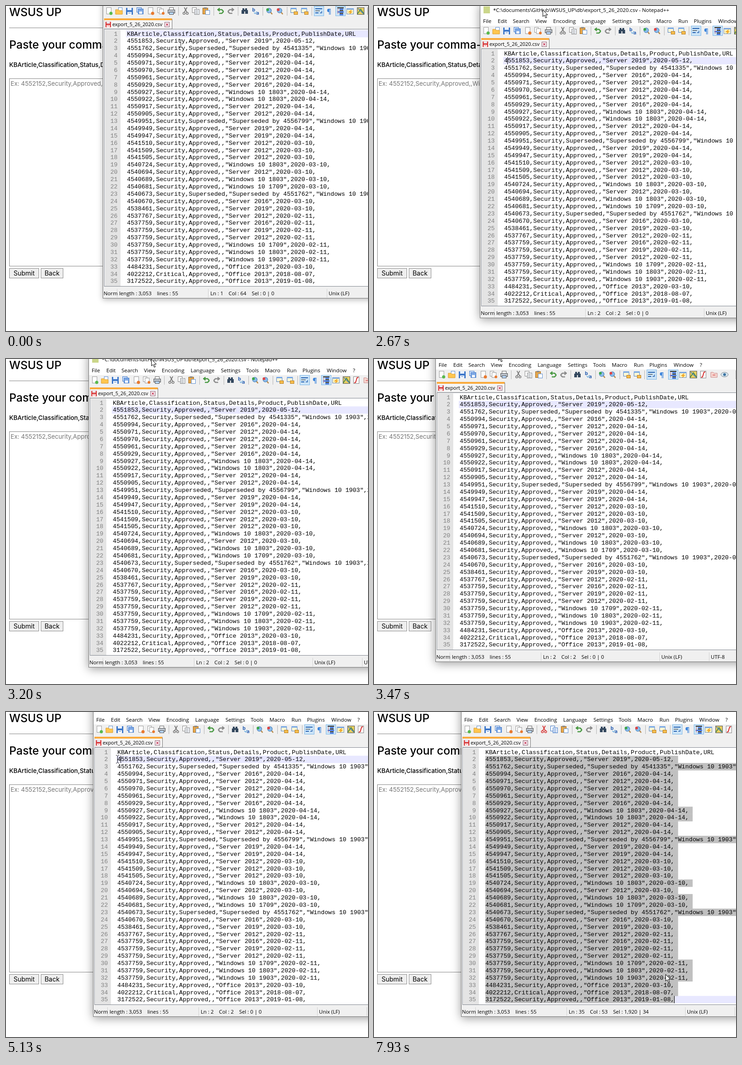
These frames come from a looping animation (790x709 px, 8000 ms). An HTML page with a canvas:

```html
<!DOCTYPE html>
<html lang="en">
<head>
<meta charset="utf-8">
<title>CSV export</title>
<style>
  html, body { margin: 0; width: 100%; height: 100%; overflow: hidden; background: #fff; }
  canvas { display: block; width: 790px; height: 709px; }
</style>
</head>
<body>
<canvas id="stage" width="790" height="709"></canvas>
<script>
const ctx = document.getElementById('stage').getContext('2d');
const UI = '"Open Sans", "Noto Sans", sans-serif';
const MONO = '13.23px "Liberation Mono", monospace';
const CHAR = 7.937, ROW = 15.88, ROW_TOP = 101.5, TEXT_X = 53;
const HEADER = 'KBArticle,Classification,Status,Details,Product,PublishDate,URL';

// id | product | date | superseding article
const records = `4551853|Server 2019|2020-05-12
4551762|Windows 10 1903|2020-04-14|4541335
4550994|Server 2016|2020-04-14
4550971|Server 2012|2020-04-14
4550970|Server 2012|2020-04-14
4550961|Server 2012|2020-04-14
4550929|Server 2016|2020-04-14
4550927|Windows 10 1803|2020-04-14
4550922|Windows 10 1803|2020-04-14
4550917|Server 2012|2020-04-14
4550905|Server 2012|2020-04-14
4549951|Windows 10 1903|2020-04-14|4556799
4549949|Server 2019|2020-04-14
4549947|Server 2019|2020-04-14
4541510|Server 2012|2020-03-10
4541509|Server 2012|2020-03-10
4541505|Server 2012|2020-03-10
4540724|Windows 10 1803|2020-03-10
4540694|Server 2012|2020-03-10
4540689|Windows 10 1803|2020-03-10
4540681|Windows 10 1709|2020-03-10
4540673|Windows 10 1903|2020-03-10|4551762
4540670|Server 2016|2020-03-10
4538461|Server 2019|2020-03-10
4537767|Server 2012|2020-02-11
4537759|Server 2016|2020-02-11
4537759|Server 2019|2020-02-11
4537759|Server 2012|2020-02-11
4537759|Windows 10 1709|2020-02-11
4537759|Windows 10 1803|2020-02-11
4537759|Windows 10 1903|2020-02-11
4484231|Office 2013|2020-03-10
4022212|Office 2013|2018-08-07
3172522|Office 2013|2019-01-08`;

const lines = [HEADER, ...records.split('\n').map(record => {
  const [id, product, date, newer] = record.split('|');
  const kind = id === '4022212' ? 'Critical' : 'Security';
  const status = newer ? `Superseded,"Superseded by ${newer}"` : 'Approved,';
  return `${id},${kind},${status},"${product}",${date},`;
})];

// Time runs in steps of 1/15 s
const STEPS = 120, FOCUS = 17, CLICK = 84, SELECT = 110;
const windowPath = [[36, 211, -49], [38, 218, -30], [41, 238, 6], [45, 238, 9], [48, 180, -14],
  [50, 114, -26], [52, 134, -26], [55, 146, -26], [57, 172, -26], [59, 190, -22]];
const approach = [[0, 381, 82], [4, 330, 20], [7, 282, 40], [9, 276, 66], [14, 274, 70],
  [17, 274, 70], [21, 290, 40], [25, 330, -10], [28, 348, -35]];
const selecting = [[59, 327, -8], [61, 332, 4], [63, 330, 18], [67, 270, 92], [69, 232, 134],
  [72, 243, 103], [77, 243, 103], [79, 240, 107], [81, 243, 103], [84, 243, 103], [89, 340, 250],
  [95, 532, 470], [97, 545, 490], [103, 682, 590], [108, 671, 623], [110, 671, 627],
  [116, 671, 627], [119, 636, 572]];

function along(path, s) {
  const next = path.findIndex(key => key[0] > s);
  if (next === 0) return path[0].slice(1);
  if (next < 0) return path[path.length - 1].slice(1);
  const a = path[next - 1], b = path[next], k = (s - a[0]) / (b[0] - a[0]);
  return [1, 2].map(i => Math.round(a[i] + (b[i] - a[i]) * k));
}

function text(str, x, y, font, color = '#000', align = 'left') {
  ctx.font = font;
  ctx.fillStyle = color;
  ctx.textAlign = align;
  ctx.fillText(str, x, y);
}

function rect(x, y, w, h, fill, stroke) {
  if (fill) { ctx.fillStyle = fill; ctx.fillRect(x, y, w, h); }
  if (stroke) {
    ctx.strokeStyle = stroke;
    ctx.lineWidth = 1;
    ctx.strokeRect(x + .5, y + .5, w - 1, h - 1);
  }
}

function line(points, color, width = 1, fill) {
  ctx.beginPath();
  points.forEach(([x, y]) => ctx.lineTo(x, y));
  if (fill) { ctx.closePath(); ctx.fillStyle = fill; ctx.fill(); }
  ctx.strokeStyle = color;
  ctx.lineWidth = width;
  ctx.stroke();
}

function disc(x, y, r, fill, stroke) {
  ctx.beginPath();
  ctx.arc(x, y, r, 0, 7);
  if (fill) { ctx.fillStyle = fill; ctx.fill(); }
  if (stroke) { ctx.strokeStyle = stroke; ctx.lineWidth = 1.5; ctx.stroke(); }
}

// Icons are drawn around their own centre
const icons = {
  sheet(badge) {
    rect(-6, -8, 11, 15, '#fff', '#9a9a9a');
    disc(4, 5, 3.5, badge);
  },
  folder() {
    rect(-2, -8, 9, 10, '#fff', '#5f8fd0');
    line([[-8, -3], [-2, -3], [0, -1], [7, -1], [7, 7], [-8, 7]], '#d99a2b', 1, '#ffc64f');
  },
  floppy(color = '#3f78c9') {
    rect(-8, -7, 15, 15, color);
    rect(-5, -7, 9, 5, '#e8f1ff');
    rect(-5, 2, 9, 6, '#fff');
    rect(-3, 4, 5, 1, color);
  },
  floppies() {
    rect(-8, -8, 11, 11, '#dbe9ff', '#3f78c9');
    rect(-5, -5, 12, 12, '#7fa9e5', '#3f78c9');
    rect(-2, 1, 6, 5, '#fff');
  },
  sheets(badge) {
    rect(-8, -8, 9, 12, '#fff', '#9a9a9a');
    rect(-4, -5, 10, 12, '#fff', '#9a9a9a');
    disc(5, 5, 3, badge);
  },
  printer() {
    rect(-5, -8, 10, 6, '#fff', '#666');
    rect(-8, -3, 16, 8, '#bcc3cc', '#555');
    rect(-5, 2, 10, 6, '#b8d8ff', '#555');
  },
  cut(color) {
    line([[-3, -8], [3, 3]], color, 1.7);
    line([[3, -8], [-3, 3]], color, 1.7);
    disc(-3.5, 5, 2.3, null, color);
    disc(3.5, 5, 2.3, null, color);
  },
  copy(color) {
    rect(-8, -8, 10, 12, '#fff', color);
    rect(-3, -4, 11, 12, '#f4f8ff', color);
    for (const y of [-1, 2, 5]) rect(-1, y, 6, 1, color);
  },
  paste() {
    rect(-8, -7, 12, 14, '#e6a64a', '#a06a20');
    rect(-5, -8, 6, 3, '#888');
    rect(-2, -2, 10, 10, '#fff', '#5f8fd0');
  },
  arrow(color, flip) {
    ctx.scale(flip, 1);
    line([[-6, -3], [3, -3], [6, 0], [6, 2], [3, 5], [-3, 5]], color, 2.6);
    line([[-2, -7], [-7, -3], [-2, 1]], color, 1, color);
  },
  binoculars() {
    rect(-7, -2, 6, 8, '#34485e');
    rect(1, -2, 6, 8, '#34485e');
    rect(-5, -6, 4, 5, '#34485e');
    rect(1, -6, 4, 5, '#34485e');
    rect(-1, -3, 2, 4, '#34485e');
  },
  replace() {
    text('b', -8, 1, 'bold 11px ' + UI, '#2d62b3');
    text('a', 1, 8, 'bold 11px ' + UI, '#2d62b3');
    line([[-4, 3], [-1, 6], [2, 1]], '#59a5e0', 1.3);
  },
  zoom(color) {
    line([[2, 2], [6, 7]], '#b88a4a', 2.5);
    disc(-1, -1, 5, '#8bbdec', '#5b8fc4');
    disc(-4, -3, 3, color);
  },
  sync() {
    rect(-8, -7, 13, 11, '#fff7d6', '#4f82c5');
    rect(-8, -7, 13, 3, '#78a8e5');
    rect(-1, 1, 9, 7, '#f6bd4d', '#b77d1f');
  },
  wrap() {
    rect(-8, -6, 15, 2, '#2460b0');
    rect(-8, -1, 10, 1, '#222');
    rect(-8, 3, 7, 2, '#2460b0');
    line([[2, 4], [6, 4], [6, 0]], '#2460b0', 1.3);
  },
  pilcrow() { text('¶', 0, 6, 'bold 15px ' + UI, '#3f86dc', 'center'); },
  indent() {
    for (let i = 0; i < 6; i++) rect(i % 3 ? -2 : -7, -8 + i * 3, i % 3 ? 8 : 14, 2, i % 2 ? '#174fd0' : '#222');
    for (let i = 0; i < 4; i++) rect(-6, -5 + i * 3, 1, 2, '#d03030');
  },
  panel() {
    rect(-8, -6, 16, 13, '#fff3bf', '#6b8fc1');
    rect(-8, -6, 16, 3, '#7ba6df');
    line([[3, -2], [-2, 2], [3, 2], [-1, 6]], '#f0a41e', 1.8);
  },
  map() {
    rect(-8, -8, 16, 16, '#e9cf62', '#555');
    line([[-7, 6], [0, -4], [7, 6]], '#4b8b4d', 2);
    line([[-6, -6], [6, 6]], '#3f78c9', 1.5);
  },
  functions() {
    rect(-7, -8, 13, 16, '#fff', '#888');
    line([[4, -6], [1, -5], [-2, 5], [-5, 6]], '#d42d2d', 2);
  },
  workspace() {
    line([[-7, -5], [-2, -5], [0, -3], [7, -3], [7, 6], [-7, 6]], '#c98787', 1, '#f6d6d0');
    rect(-3, 0, 6, 2, '#d77');
  },
  eye() {
    ctx.beginPath();
    ctx.ellipse(0, 0, 8, 5, 0, 0, 7);
    ctx.fillStyle = '#d7e5ed';
    ctx.fill();
    ctx.strokeStyle = '#7b8790';
    ctx.lineWidth = 1;
    ctx.stroke();
    disc(0, 0, 3, '#3e75a3');
  }
};

function icon(name, x, y, ...args) {
  ctx.save();
  ctx.translate(x, y);
  icons[name](...args);
  ctx.restore();
}

function drawPage() {
  const heading = '500 24.4px Inter, sans-serif';
  rect(0, 0, 790, 709, '#fff');
  text('WSUS UP', 7, 22, heading);
  rect(7, 47, 783, 1, '#9a9a9a');
  rect(7, 48, 783, 1, '#e6e6e6');
  text('Paste your comma-separated values', 7, 93, heading);
  text(HEADER, 7, 133, '500 13.4px Inter, sans-serif');
  rect(7, 158, 900, 410, '#fff', '#858585');
  text('Ex: 4552152,Security,Approved,,Windows', 10, 174, '13.3px Inter, sans-serif', '#757575');
  for (const [label, x, w] of [['Submit', 7, 65], ['Back', 76, 49]]) {
    rect(x, 572, w, 22, '#efefef', '#8a8a8a');
    text(label, x + w / 2, 588, '14px Inter, sans-serif', '#000', 'center');
  }
}

function drawToolbar(selected) {
  const y = 60;
  for (const x of [165, 242, 295, 349, 402, 456, 655]) rect(x, y - 9, 1, 19, '#b4b4b4');
  for (const x of [472, 519]) rect(x - 11, y - 11, 22, 22, '#cce4f7', '#7fb8e8');
  const items = [['sheet', 14, '#59b94c'], ['folder', 36], ['floppy', 59], ['floppies', 82],
    ['sheet', 105, '#e8792f'], ['sheets', 127, '#e8792f'], ['printer', 150],
    ['cut', 181, selected ? '#d63434' : '#777'], ['copy', 203, selected ? '#3f78c9' : '#8a8a8a'],
    ['paste', 226], ['arrow', 257, '#4b9a45', 1], ['arrow', 280, '#8c8c8c', -1],
    ['binoculars', 310], ['replace', 334], ['zoom', 364, '#3ca64a'], ['zoom', 387, '#e04545'],
    ['sync', 418], ['sync', 441], ['wrap', 472], ['pilcrow', 494], ['indent', 519],
    ['panel', 540], ['map', 563], ['functions', 585], ['workspace', 608], ['eye', 631]];
  for (const [name, x, ...args] of items) icon(name, x, y, ...args);
}

function drawEditor(s) {
  const selected = s >= SELECT;
  const current = s < FOCUS ? 0 : selected ? 34 : 1;
  const column = selected ? 52 : s < CLICK ? 1 : 0;
  const top = row => ROW_TOP + row * ROW;

  rect(3, 99, 760, 562, '#fff', '#828790');
  rect(5, 101, 34, 559, '#e4e4e4');
  rect(TEXT_X - 2, top(current), 720, ROW, '#e8e8ff');
  lines.forEach((str, row) => {
    const last = row === 34;
    if (selected && row) {
      const width = (str.length + (last ? 0 : 1)) * CHAR;
      if (last) rect(TEXT_X - 2, top(row), 2, ROW, '#fff');
      rect(TEXT_X, top(row), width, ROW + (last ? 0 : .3), '#c0c0c0');
    }
    const baseline = top(row) + 12;
    text(row + 1, 32.5, baseline, MONO, '#808080', 'right');
    text(str, TEXT_X, baseline, MONO);
  });

  const blinkStart = s < CLICK ? 36 : CLICK;
  const lit = selected || (s - blinkStart + 34) % 17 < 8;
  if (s >= FOCUS && lit) rect(Math.round(TEXT_X + column * CHAR) - 1, top(current), 1, ROW, '#000');
}

function drawStatus(s) {
  const font = '11.3px ' + UI;
  const position = s < FOCUS ? 'Ln : 1    Col : 64    Sel : 0 | 0'
    : s < CLICK ? 'Ln : 2    Col : 2    Sel : 0 | 0'
    : s < SELECT ? 'Ln : 2    Col : 1    Sel : 0 | 0'
    : 'Ln : 35    Col : 53    Sel : 1,920 | 34';
  rect(1, 661, 760, 25, '#f0f0f0');
  for (const x of [31, 230, 489, 597]) rect(x, 666, 1, 19, '#d2d2d2');
  text('Norm', 2, 680, font);
  text('length : 3,053    lines : 55', 36, 680, font);
  text(position, 235, 680, font);
  text('Unix (LF)', 493, 680, font);
  text('UTF-8', 601, 680, font);
}

function drawWindow(s, left, top) {
  ctx.save();
  ctx.translate(left, top);
  ctx.shadowColor = `rgba(0,0,0,${s < FOCUS ? .28 : .4})`;
  ctx.shadowBlur = s < FOCUS ? 12 : 20;
  ctx.shadowOffsetY = 3;
  rect(0, 0, 762, 687, '#fff');
  ctx.shadowColor = 'transparent';
  rect(0, 49, 762, 638, '#f0f0f0');

  rect(8, 7, 14, 15, '#cbd68a');
  text('*C:\\documents\\GitHub\\WSUS_UP\\db\\export_5_26_2020.csv - Notepad++', 29, 19, '11.4px ' + UI);
  const menu = [['File', 7], ['Edit', 39], ['Search', 72], ['View', 121], ['Encoding', 160],
    ['Language', 223], ['Settings', 289], ['Tools', 344], ['Macro', 385], ['Run', 433],
    ['Plugins', 467], ['Window', 520], ['?', 577]];
  for (const [label, x] of menu) text(label, x, 43, '11.5px ' + UI);
  drawToolbar(s >= SELECT);

  rect(3, 76, 149, 23, '#f5f5f5', '#c8c8c8');
  rect(3, 76, 148, 4, '#faaa3c');
  rect(151, 78, 1, 21, '#777');
  ctx.save();
  ctx.translate(12.5, 89);
  ctx.scale(.8, .8);
  icons.floppy('#d83a3a');
  ctx.restore();
  text('export_5_26_2020.csv', 21, 93, '10.8px ' + UI);
  rect(135, 84, 11, 11, '#fff', '#8c5a70');
  line([[138, 87], [143, 92]], '#c23a5a', 1.5);
  line([[143, 87], [138, 92]], '#c23a5a', 1.5);

  drawEditor(s);
  drawStatus(s);
  rect(0, 0, 762, 687, null, '#777');
  ctx.restore();
}

function drawPointer(s, left, top) {
  const [x, y] = s < 28 ? along(approach, s)
    : s < 59 ? [left + 137, top + 14]
    : along(selecting, s);
  ctx.save();
  ctx.translate(x, y);
  if (y - top < ROW_TOP || s > 117) {
    line([[.5, .5], [.5, 15], [4, 12], [6.5, 18], [9, 17], [6.5, 11.3], [11, 11.3]], '#000', 1, '#fff');
  } else {
    line([[-3, -8.5], [-1, -8.5], [.5, -7], [2, -8.5], [4, -8.5]], '#222');
    line([[.5, -7], [.5, 7]], '#222');
    line([[-3, 8.5], [-1, 8.5], [.5, 7], [2, 8.5], [4, 8.5]], '#222');
  }
  ctx.restore();
}

function draw() {
  // The small offset absorbs timestamps rounded just below a step
  const s = Math.floor(performance.now() % 8000 * .015 + .06) % STEPS;
  const [left, top] = along(windowPath, s);
  drawPage();
  drawWindow(s, left, top);
  drawPointer(s, left, top);
  requestAnimationFrame(draw);
}
draw();
</script>
</body>
</html>
```
